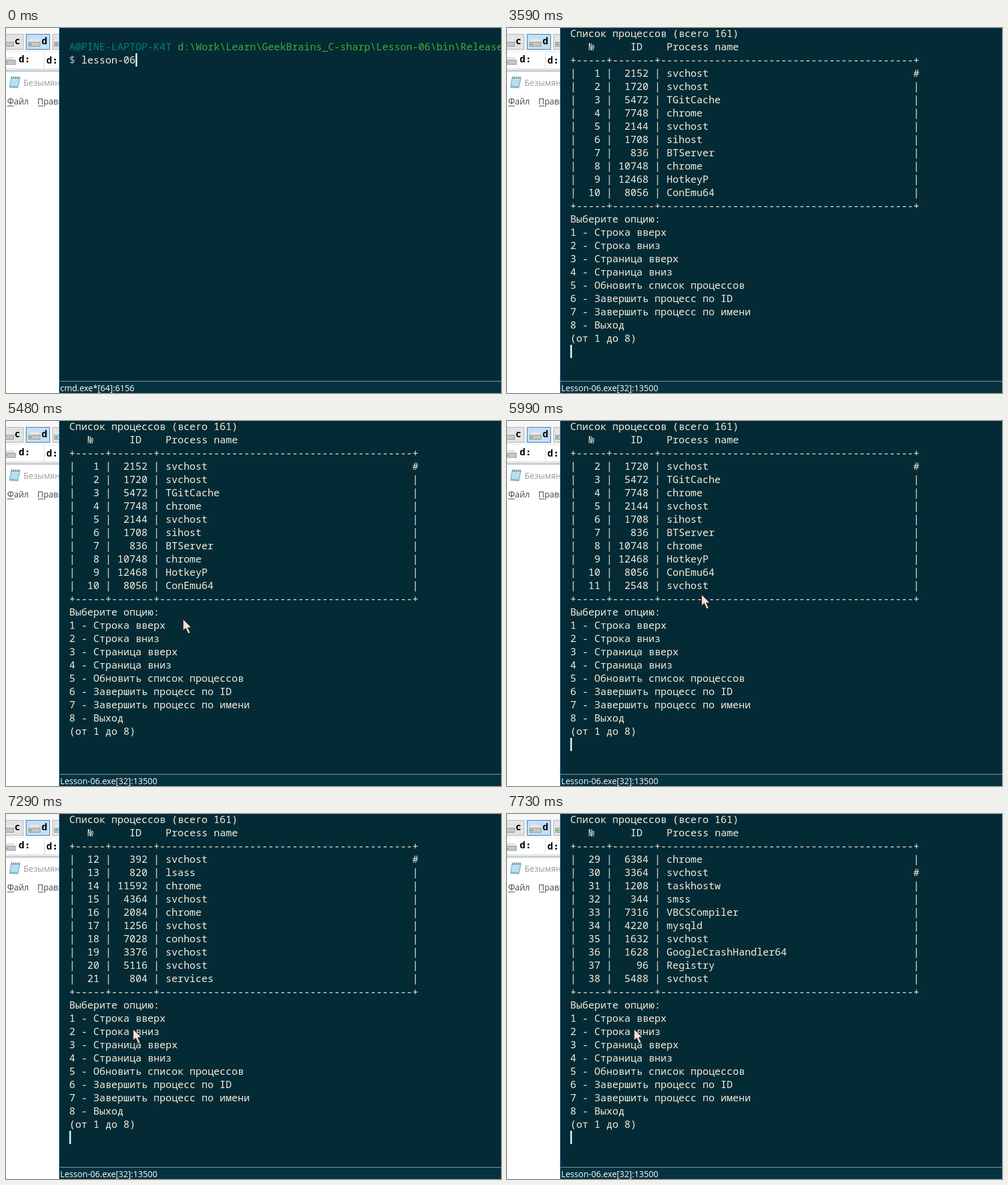
Animation of 822 by 606 pixels, one loop 8000 ms. Source, as an HTML page with a canvas:

```html
<!DOCTYPE html>
<html lang="ru">
<head>
<meta charset="utf-8">
<style>
html, body { margin: 0; width: 100%; height: 100%; overflow: hidden; background: #fff; }
canvas { display: block; }
</style>
</head>
<body>
<canvas id="stage" width="822" height="606"></canvas>
<script>
const ctx = document.getElementById('stage').getContext('2d', { alpha: false });
const LOOP = 8000;
const START = 1450;
const MONO = '16.667px "Noto Sans Mono", monospace';
const UI = '14px "Open Sans", "Noto Sans", sans-serif';
const BOLD = 'bold 16px "DejaVu Sans Mono", monospace';
const CREAM = '#f5eddb';

const processes = `2152 svchost, 1720 svchost, 5472 TGitCache, 7748 chrome, 2144 svchost,
  1708 sihost, 836 BTServer, 10748 chrome, 12468 HotkeyP, 8056 ConEmu64,
  2548 svchost, 392 svchost, 820 lsass, 11592 chrome, 4364 svchost,
  2084 chrome, 1256 svchost, 7028 conhost, 3376 svchost, 5116 svchost,
  804 services, 11576 ctfmon, 800 svchost, 8988 StandardCollector.Service,
  2520 licecap, 2872 svchost, 3808 chrome, 9836 RAVBg64, 6384 chrome,
  3364 svchost, 1208 taskhostw, 344 smss, 7316 VBCSCompiler, 4220 mysqld,
  1632 svchost, 1628 GoogleCrashHandler64, 96 Registry, 5488 svchost`
  .split(',').map(line => line.trim().split(' '));

const menu = ['Выберите опцию:', '1 - Строка вверх', '2 - Строка вниз',
  '3 - Страница вверх', '4 - Страница вниз', '5 - Обновить список процессов',
  '6 - Завершить процесс по ID', '7 - Завершить процесс по имени', '8 - Выход', '(от 1 до 8)'];

const pointerStops = [
  { t: 4110, x: 806, y: 45 },
  { t: 4910, x: 60, y: 420 },
  { t: 5150, x: 135, y: 524 },
  { t: 5450, x: 285, y: 322 },
  { t: 5750, x: 368, y: 388 },
  { t: 5990, x: 323, y: 288 },
  { t: 6170, x: 323, y: 288 },
  { t: 6680, x: 211, y: 357 }
];

const clamp = (value, low, high) => Math.max(low, Math.min(high, value));

function rect(x, y, w, h, color) {
  ctx.fillStyle = color;
  ctx.fillRect(x, y, w, h);
}

function box(x, y, w, h, fill, border) {
  rect(x, y, w, h, border);
  rect(x + 1, y + 1, w - 2, h - 2, fill);
}

function label(text, x, y, font, color) {
  ctx.font = font;
  ctx.fillStyle = color;
  ctx.fillText(text, x, y);
}

function polygon(points, fill) {
  ctx.beginPath();
  points.forEach(([x, y]) => ctx.lineTo(x, y));
  ctx.closePath();
  ctx.fillStyle = fill;
  ctx.fill();
}

const put = (col, row, text, color = CREAM) => label(text, 105 + col * 10, 15 + row * 22, MONO, color);
const caret = (col, row) => rect(105 + col * 10, row * 22 - 2, 3, 22, '#c0e4f4');

function drive(x, y) {
  polygon([[x + 3, y], [x + 17, y], [x + 20, y + 6], [x, y + 6]], '#e6e6e6');
  box(x, y + 5, 20, 8, '#c6c6c6', '#959595');
  rect(x + 2, y + 8, 4, 2, '#48b848');
}

function drawDesktop() {
  rect(0, 0, 88, 606, '#fff');
  rect(0, 0, 88, 68, '#f7f7f7');
  box(-1, 10, 30, 26, '#e3e3e3', '#b4b4b4');
  box(33, 10, 40, 26, '#c4dff5', '#3378b5');
  box(77, 10, 30, 26, '#e3e3e3', '#b4b4b4');
  for (const x of [-7, 37, 80]) drive(x, 18);
  label('c', 14, 27, BOLD, '#000');
  label('d', 59, 27, BOLD, '#000');
  rect(0, 40, 63, 27, '#fff');
  rect(64, 42, 24, 25, '#fff');
  rect(63, 42, 1, 25, '#d8d8d8');
  drive(-4, 48);
  label('d:', 21, 57, BOLD, '#000');
  label('d:', 67, 59, BOLD, '#000');
  rect(0, 67, 88, 4, '#dfe5ea');
  rect(0, 71, 88, 1, '#8b9aa6');

  polygon([[8, 82], [24, 82], [20, 100], [5, 99]], '#7fb9cc');
  polygon([[9, 84], [22, 84], [19, 97], [7, 96]], '#b5e0ec');
  for (let x = 9; x < 24; x += 3) rect(x, 80, 1, 4, '#777');
  label('Безымянный', 29, 96, UI, '#999');
  label('Файл', 2, 127, UI, '#444');
  label('Правка', 52, 127, UI, '#444');
  rect(2, 129, 11, 1, '#444');
  rect(53, 129, 9, 1, '#444');
}

function drawTerminal(t) {
  rect(88, 0, 1, 606, '#1b6fb5');
  rect(89, 0, 733, 606, '#042b35');
  rect(89, 587, 733, 19, '#04323f');
  rect(89, 586, 733, 1, '#8a9b9f');
  label(t < START ? 'cmd.exe*[64]:6156' : 'Lesson-06.exe[32]:13500', 90, 603, UI, '#fff');
}

function drawPrompt() {
  put(0, 1, 'A@PINE-LAPTOP-K4T', '#087d82');
  put(18, 1, 'd:\\Work\\Learn\\GeekBrains_C-sharp\\Lesson-06\\bin\\Release', '#43ab38');
  put(0, 2, '$', '#b9c0bc');
  put(2, 2, 'lesson-06');
}

// Four separate key presses, then the key is held down and repeats.
function firstRow(t) {
  const presses = clamp(Math.floor((t - 5667) / 253), 0, 4);
  const repeats = clamp(Math.floor((t - 7100) / 25.3), 0, 24);
  return presses + repeats;
}

function drawTable(first) {
  const border = '+' + [5, 7, 42].map(n => '-'.repeat(n) + '+').join('');
  const thumb = Math.floor(first / 16.1);
  put(0, 0, 'Список процессов (всего 161)');
  put(3, 1, '№');
  put(10, 1, 'ID');
  put(16, 1, 'Process name');
  put(0, 2, border);
  processes.slice(first, first + 10).forEach(([id, name], i) => {
    const number = String(first + i + 1).padStart(4);
    put(0, 3 + i, `|${number} | ${id.padStart(5)} | ${name.padEnd(41)}${i === thumb ? '#' : '|'}`);
  });
  put(0, 13, border);
  menu.forEach((line, i) => put(0, 14 + i, line));
}

// The blink restarts when the program starts; key presses keep the caret lit.
function caretLit(t) {
  const phase = t < START ? t + 435 : t - 1485;
  return t >= 6680 || Math.floor(phase / 525) % 2 === 0;
}

function pointerAt(t) {
  const next = pointerStops.findIndex(stop => stop.t > t);
  if (next < 0) return pointerStops.at(-1);
  const from = pointerStops[next - 1], to = pointerStops[next];
  const k = (t - from.t) / (to.t - from.t);
  const eased = next === 1 ? 1 - (1 - k) ** 2 : k;
  const mix = axis => Math.round(from[axis] + (to[axis] - from[axis]) * eased);
  return { x: mix('x'), y: mix('y') };
}

function drawPointer(t) {
  if (t < pointerStops[0].t) return;
  const { x, y } = pointerAt(t);
  ctx.save();
  ctx.translate(x, y);
  if (x < 89) {
    rect(-1, -11, 3, 22, '#000');
    rect(-5, -12, 11, 3, '#000');
    rect(-5, 9, 11, 3, '#000');
  } else {
    polygon([[0, 0], [0, 19], [4.5, 15], [8.5, 24], [12, 22.5], [8, 14], [14, 14]], '#ffdcd5');
    ctx.strokeStyle = '#101820';
    ctx.stroke();
  }
  ctx.restore();
}

function draw(t) {
  drawDesktop();
  drawTerminal(t);
  if (t < START) drawPrompt();
  else drawTable(firstRow(t));
  if (caretLit(t)) t < START ? caret(11, 2) : caret(0, 24);
  drawPointer(t);
}

function tick() {
  draw(performance.now() % LOOP);
  requestAnimationFrame(tick);
}
tick();
</script>
</body>
</html>
```
